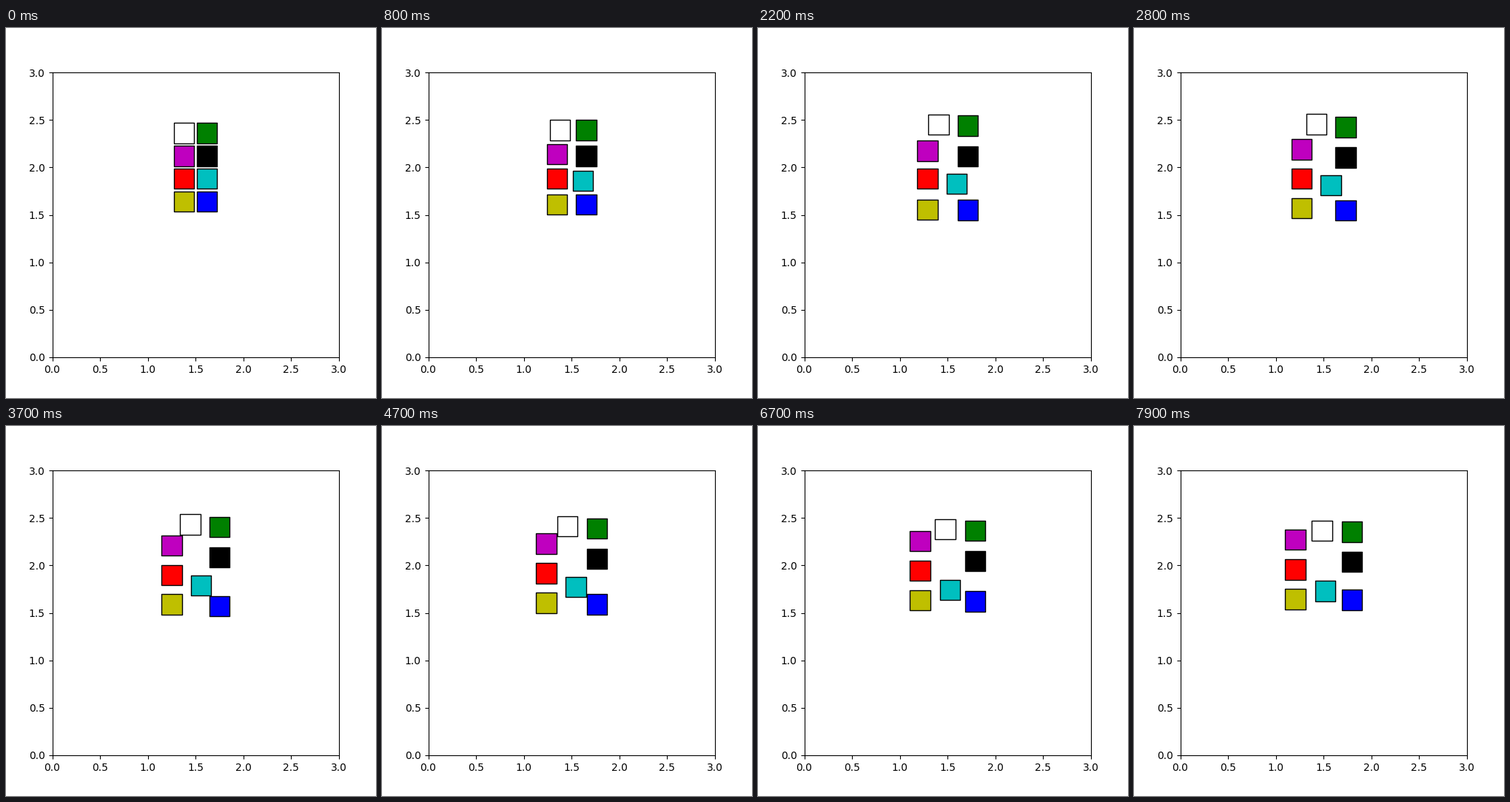
These frames come from a looping animation (500 by 500 pixels, 8 s). A matplotlib script:

```python
import numpy as np
import matplotlib.pyplot as plt
from matplotlib.animation import FuncAnimation

FRAMES, INTERVAL = 80, 100
CENTRE = np.array([1.5, 2.0])
START_GAP, GOAL_GAP = 0.24, 0.315      # spacing of the 2x4 block and the 3x3 ring
PACE = 0.0041                          # speed of the spreading phase, per frame
X_TURN, X_WAIT = 26, 16
X_EASE, Y_EASE = 35, 50                # time constants of the final approach

# Colour, cell in the ring (column, row), frame at which the height turns.
# Listed row by row as they stand in the starting block.
ROBOTS = [
    ("w", 0, 1, 25), ("g", 1, 1, 20),
    ("m", -1, 1, 26), ("k", 1, 0, 20),
    ("r", -1, 0, 29), ("c", 0, -1, 26),
    ("y", -1, -1, 21), ("b", 1, -1, 25),
]


def spread_then_settle(t, start, speed, begin, turn, goal, ease):
    """Steady run from begin to turn, then exponential approach to goal."""
    pos = start + speed * (np.clip(t, begin, turn) - begin)
    return goal + (pos - goal) * np.exp(-np.maximum(t - turn, 0) / ease)


def path(index, col, row, turn):
    t = np.arange(FRAMES)
    side, level = index % 2 - 0.5, 1.5 - index // 2
    x0, y0 = CENTRE + START_GAP * np.array([side, level])
    goal_x, goal_y = CENTRE + GOAL_GAP * np.array([col, row])

    # Outer columns spread at once; middle ones wait, then move inwards.
    vx = PACE * (col or -np.sign(side))
    x = spread_then_settle(t, x0, vx, 0 if col else X_WAIT, X_TURN,
                           goal_x, X_EASE)

    # Squares that start inside the block climb or sink more slowly.
    vy = PACE * row * (1 if abs(level) > 1 else 0.6)
    y = spread_then_settle(t, y0, vy, 0, turn, goal_y, Y_EASE)
    return np.column_stack([x, y])


paths = np.array([path(i, *cell) for i, (_, *cell) in enumerate(ROBOTS)])

fig, ax = plt.subplots(figsize=(5, 5), dpi=100)
ax.set_xlim(0, 3)
ax.set_ylim(0, 3)
squares = ax.scatter(*paths[:, 0].T, s=392, marker="s", linewidths=1,
                     c=[robot[0] for robot in ROBOTS], edgecolors="k")


def update(i):
    squares.set_offsets(paths[:, i])
    return [squares]


anim = FuncAnimation(fig, update, frames=FRAMES, interval=INTERVAL,
                     repeat=True, repeat_delay=0)
plt.show()
```
